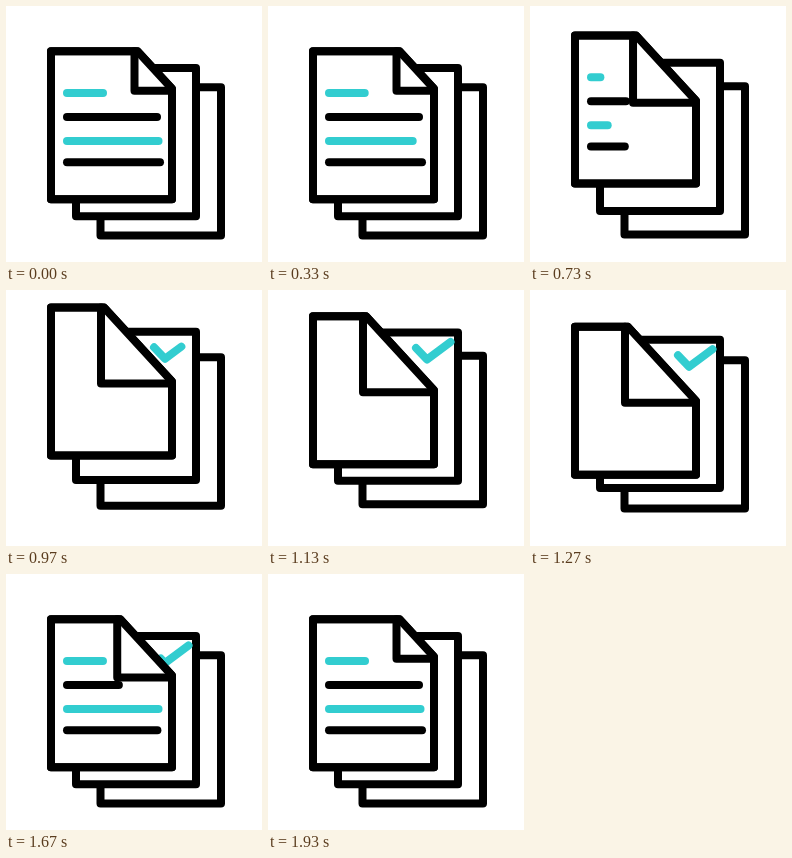
Recreate the animation shown at these times as an HTML page. Size 256 by 256 pixels, loop 2.5 s.

```html
<!DOCTYPE html>
<html lang="en">
<head>
<meta charset="utf-8">
<title>Documents</title>
<style>
  html, body { margin: 0; width: 100%; height: 100%; overflow: hidden; background: #fff; }
  svg { display: block; width: 100%; height: 100%; }
  path { fill: none; stroke: #000; stroke-width: 8; stroke-linecap: round; stroke-linejoin: round; }
  .paper { fill: #fff; }
  .accent { stroke: #32cdd0; }
</style>
</head>
<body>
<svg viewBox="0 0 256 256">
  <g id="back"><path class="paper" d="M94.5 81.2H215V229.6H94.5Z"/></g>
  <g id="middle">
    <path class="paper" d="M70 62H190V210.2H70Z"/>
    <path id="check" class="accent" d="M148 77.5L159 89L182.5 71.5"/>
  </g>
  <g id="front">
    <path id="sheet" class="paper"/>
    <g id="lines"></g>
    <path id="flap" class="paper"/>
    <path id="outline"/>
  </g>
</svg>
<script>
const LOOP = 2500;
const LEFT = 45, RIGHT = 166, TOP = 45.2, BOTTOM = 193.2;
const LINE_X = 61;

// Each span is [leave start, leave end, return start, return end] in ms.
const LIFTS = [
  { id: 'front', rise: 28.5, span: [525, 910, 915, 1470] },
  { id: 'middle', rise: 20.5, span: [600, 1000, 1070, 1533] },
  { id: 'back', rise: 16, span: [670, 1060, 1070, 1610] }
];
const FOLD = [530, 825, 1480, 1870];
const CHECK = [760, 1055, 1560, 1930];
const LINES = [
  { y: 87, end: 97, accent: true, span: [295, 950, 1290, 1680] },
  { y: 111, end: 151, span: [380, 990, 1390, 1900] },
  { y: 135, end: 152.5, accent: true, span: [200, 930, 1260, 1630] },
  { y: 156.2, end: 154, span: [355, 990, 1320, 1710] }
];

const get = id => document.getElementById(id);
const sheet = get('sheet'), flap = get('flap'), outline = get('outline'), check = get('check');
const checkLength = check.getTotalLength();

for (const line of LINES) {
  line.path = document.createElementNS('http://www.w3.org/2000/svg', 'path');
  if (line.accent) line.path.setAttribute('class', 'accent');
  get('lines').append(line.path);
}

function ease(t, from, to) {
  const u = Math.min(1, Math.max(0, (t - from) / (to - from)));
  return u * u * (3 - 2 * u);
}

// Goes from 0 to 1 and back to 0.
const away = (t, [a, b, c, d]) => ease(t, a, b) - ease(t, c, d);

function show(path, length) {
  path.style.visibility = length > 0.5 ? 'visible' : 'hidden';
}

function drawFold(t) {
  const shift = 33.5 * away(t, FOLD);
  const x = 128.5 - shift;
  const y = TOP + 39.5 + shift * 1.09;
  const edge = `M${LEFT} ${TOP}H${x + 3}L${RIGHT} ${y - 2}V${BOTTOM}H${LEFT}Z`;
  sheet.setAttribute('d', edge);
  outline.setAttribute('d', edge);
  flap.setAttribute('d', `M${x} ${TOP}V${y}H${RIGHT}`);
}

function drawLine(line, t) {
  const length = (line.end - LINE_X) * (1 - away(t, line.span));
  line.path.setAttribute('d', `M${LINE_X} ${line.y}h${length}`);
  show(line.path, length);
}

function drawCheck(t) {
  const [a, b, c, d] = CHECK;
  const start = ease(t, c, d) * checkLength;
  const length = ease(t, a, b) * checkLength - start;
  check.style.strokeDasharray = `${Math.max(0, length)} 999`;
  check.style.strokeDashoffset = -start;
  show(check, length);
}

function draw(t) {
  for (const { id, rise, span } of LIFTS) {
    get(id).setAttribute('transform', `translate(0 ${-rise * away(t, span)})`);
  }
  drawFold(t);
  LINES.forEach(line => drawLine(line, t));
  drawCheck(t);
}

const began = performance.now();
function tick() {
  draw((performance.now() - began) % LOOP);
  requestAnimationFrame(tick);
}
tick();
</script>
</body>
</html>
```
